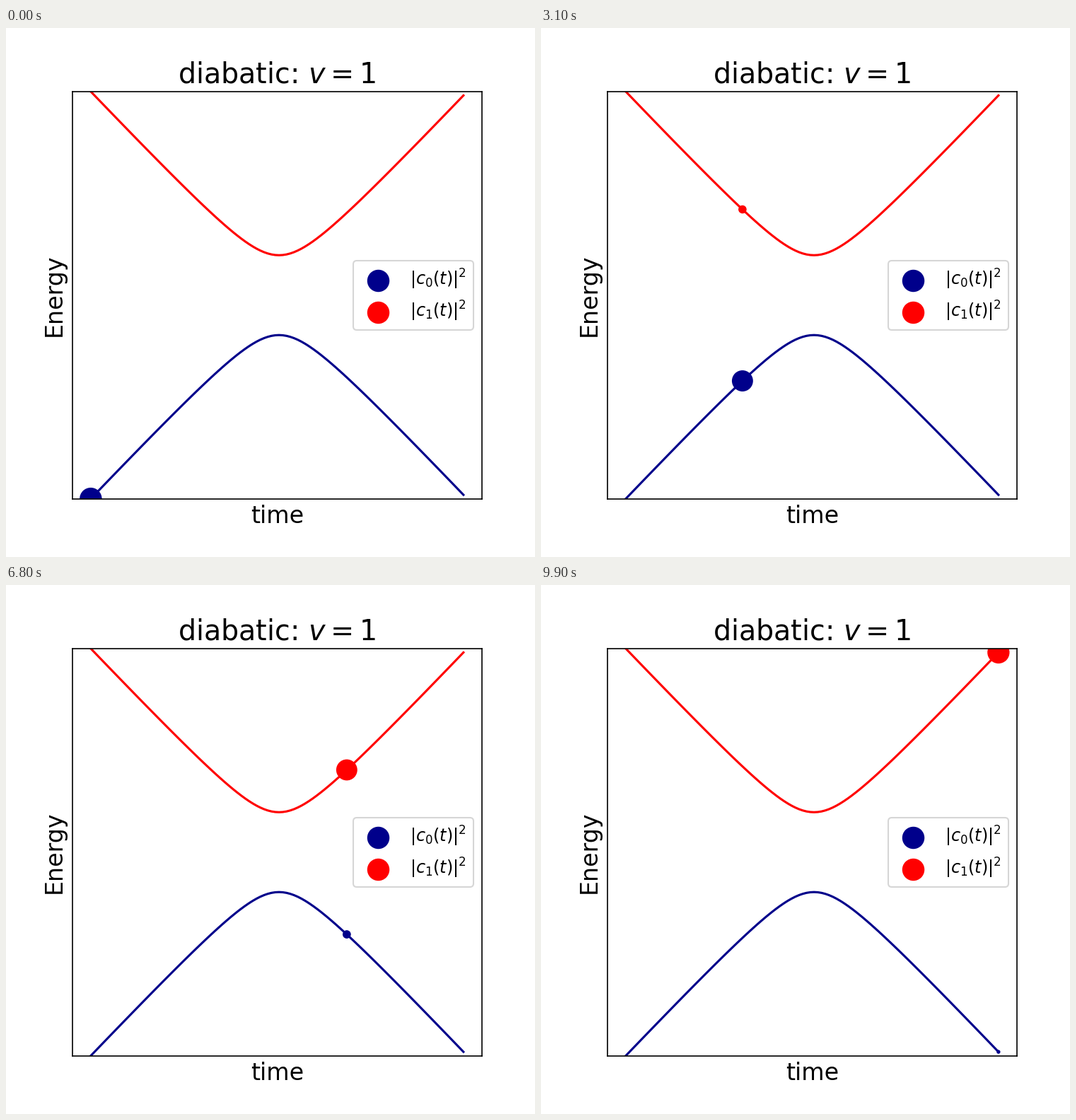
Animation of 748x748 px, one loop 10000 ms. Source, as a matplotlib script:

```python
import numpy as np
import matplotlib.pyplot as plt
from matplotlib.animation import FuncAnimation

SIZE = 5
DPI = 748 / SIZE
FRAMES = 100
DT = 0.1
SUBSTEPS = 40
MARKER_AREA = 200
COLORS = ["darkblue", "red"]

v, gap = 1.0, 1.0
t = -5 + DT * np.arange(FRAMES)
energy = np.sqrt((v * t) ** 2 + gap ** 2)
levels = np.column_stack([-energy, energy])


def propagator(time, dt):
    """exp(-i H dt) for H = v t sigma_z + gap sigma_x."""
    e = np.hypot(v * time, gap)
    h = np.array([[v * time, gap], [gap, -v * time]])
    return np.cos(e * dt) * np.eye(2) - 1j * np.sin(e * dt) / e * h


def populations():
    """Occupation of both states, starting in the lower one."""
    c = np.array([1, 0], dtype=complex)
    dt = DT / SUBSTEPS
    result = []
    for start in t:
        result.append(np.abs(c) ** 2)
        for k in range(SUBSTEPS):
            c = propagator(start + (k + 0.5) * dt, dt) @ c
    return np.array(result)


prob = populations()

fig, ax = plt.subplots(figsize=(SIZE, SIZE), dpi=DPI)
for n, color in enumerate(COLORS):
    ax.plot(t, levels[:, n], color=color, lw=1.5)
    ax.scatter([], [], s=MARKER_AREA, lw=1, color=color,
               label=f"$|c_{n}(t)|^2$")

# Both dots in one collection, so they move without pixel snapping.
dots = ax.scatter([t[0], t[0]], levels[0], s=MARKER_AREA * prob[0],
                  lw=1, color=COLORS, zorder=2.2)

margin = 0.05 * (t[-1] - t[0])
ax.set_xlim(t[0] - margin, t[-1] + margin)
ax.set_ylim(-5.1, 5.1)
ax.set_xticks([])
ax.set_yticks([])
ax.set_xlabel("time", fontsize=16)
ax.set_ylabel("Energy", fontsize=16)
ax.set_title("diabatic: $v=1$", fontsize=19.1)
legend = ax.legend(loc="center right", fontsize=12, labelspacing=0.45)
for text in legend.get_texts():
    text.set_fontsize(11.5)


def update(i):
    dots.set_offsets(np.column_stack([[t[i], t[i]], levels[i]]))
    dots.set_sizes(MARKER_AREA * prob[i])
    return [dots]


anim = FuncAnimation(fig, update, frames=FRAMES, interval=100,
                     repeat=True, repeat_delay=0)
plt.show()
```
